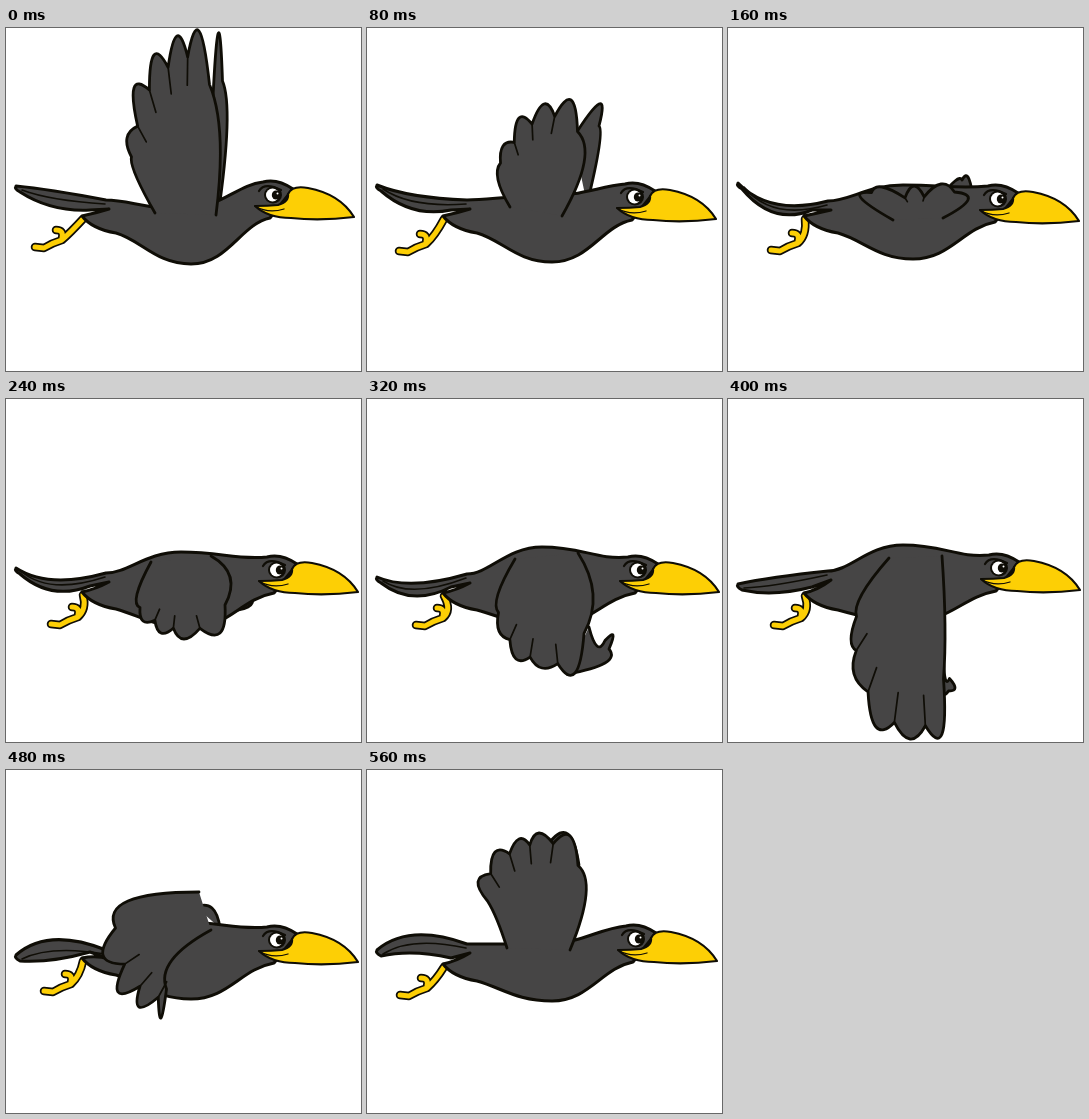
Write an HTML page with a canvas that moves like this. It is 355x343 px and loops after 640 ms.

```html
<!DOCTYPE html>
<html lang="en">
<head>
<meta charset="utf-8">
<title>Flying crow</title>
<style>
  html, body { margin: 0; width: 100%; height: 100%; overflow: hidden; background: #fff; }
  canvas { display: block; }
</style>
</head>
<body>
<canvas id="stage" width="355" height="343"></canvas>
<script>
const ctx = document.getElementById('stage').getContext('2d');
const STEP = 80;
const INK = '#0f0d06', FEATHER = '#464545', YELLOW = '#fdcf05';

// Per pose: head dx, dy; heights of tail tip, tail top, tail bottom,
// tail root, back, rump, belly; heel x, y.
const torsos = [
  [0, 0, 158, 161, 184, 172, 181, 188, 236, 56, 212],
  [1, 2, 157, 170, 190, 172, 168, 188, 234, 59, 216],
  [3, 4, 155, 188, 198, 173, 157, 188, 231, 70, 215],
  [4, 4, 169, 190, 202, 174, 153, 193, 229, 72, 218],
  [4, 4, 178, 192, 208, 175, 148, 194, 227, 76, 219],
  [4, 2, 185, 178, 198, 172, 146, 194, 222, 73, 219],
  [4, 3, 185, 157, 193, 180, 152, 188, 229, 65, 214],
  [2, 2, 180, 153, 179, 174, 174, 194, 231, 60, 218]
];

// Wings: notch depth, then rear root, feather tips, front edge, front root.
const downstroke = [
  [.13, [149, 185], [130, 148], [121, 110], [128, 60], [148, 27], [171, 8], [193, 3], [214, 110], [210, 187]],
  [.13, [143, 179], [131, 152], [136, 118], [152, 90], [177, 76], [204, 72], [217, 135], [195, 188]],
  [.35, [165, 192], [133, 170], [154, 159], [186, 158], [213, 156], [240, 172], [215, 190]],
  [.1, [145, 163], [131, 195], [137, 222], [155, 234], [178, 240], [214, 234], [224, 178], [205, 157]]
];
const upstroke = [
  [.06, [148, 160], [131, 195], [132, 232], [149, 260], [175, 269], [208, 274], [226, 195], [211, 154]],
  [.06, [161, 159], [134, 195], [123, 240], [126, 275], [148, 328], [182, 340], [214, 335], [217, 225], [214, 157]],
  [.15, [193, 122], [122, 131], [97, 185], [112, 222], [133, 237], [155, 248], [166, 190], [205, 160]],
  [.08, [140, 178], [130, 150], [111, 112], [128, 82], [152, 69], [172, 63], [203, 66], [219, 125], [203, 180]]
];
const nearWings = [...downstroke, ...upstroke];

const farWings = [
  [0, [206, 90], [212, 6], [221, 100], [212, 188]],
  [0, [206, 110], [232, 76], [232, 120], [220, 176]],
  [0, [212, 170], [227, 153], [241, 151], [246, 180]],
  [0, [222, 185], [249, 185], [242, 208], [218, 212]],
  [0, [200, 275], [238, 264], [246, 236], [230, 247], [222, 228]],
  [0, [216, 204], [216, 270], [227, 289], [214, 295], [206, 285]],
  [0, [190, 137], [206, 138], [214, 158]],
  [0, [183, 72], [201, 64], [212, 95]]
];

const mix = (a, b, t) => a.map((v, i) => v + (b[i] - v) * t);

function line(path, color, width) {
  ctx.strokeStyle = color;
  ctx.lineWidth = width;
  ctx.stroke(path);
}

function shape(path, fill, width) {
  ctx.fillStyle = fill;
  ctx.fill(path);
  line(path, INK, width);
}

// Each tip is the crest of a curve running from one notch to the next.
function drawWing([depth, rear, ...rest]) {
  const front = rest.pop();
  const center = mix(rear, front, .5);
  const outline = new Path2D(), creases = new Path2D();
  let from = rear;
  outline.moveTo(...rear);
  rest.forEach((tip, i) => {
    const inner = i > 0 && i < rest.length - 2;
    const to = i === rest.length - 1 ? front
      : mix(mix(tip, rest[i + 1], .5), center, inner ? depth : 0);
    outline.quadraticCurveTo(...mix(mix(from, to, .5), tip, 2), ...to);
    if (inner && depth) {
      creases.moveTo(...to);
      creases.lineTo(...mix(to, center, .18));
    }
    from = to;
  });
  shape(outline, FEATHER, 2.8);
  line(creases, INK, 1.7);
}

function drawBody([dx, dy, tip, top, bottom, root, back, rump, belly]) {
  shape(new Path2D(`M${287 + dx} ${161 + dy}Q${271 + dx} ${150 + dy} ${257 + dx} ${154 + dy}
    C230 ${157 + dy} 215 ${back} 175 ${back}C140 ${back} 122 ${root} 100 ${root}
    Q42 ${top} 10 ${tip}Q8 ${tip + 3} 14 ${tip + 6}
    Q45 ${bottom} 84 ${rump - 6}L103 ${root + 9}Q90 ${rump - 3} 76 ${rump}
    Q86 ${rump + 13} 110 ${rump + 17}C135 ${rump + 24} 150 ${belly} 185 ${belly}
    C222 ${belly} 235 ${196 + dy} ${264 + dx} ${190 + dy}Z`), FEATHER, 3);
  line(new Path2D(`M16 ${tip + 4}Q44 ${(top + bottom) / 2} 99 ${root + 4}`), INK, 1.6);
}

function drawLeg(rump, x, y) {
  const leg = new Path2D(`M77 ${rump + 3}Q${x + 9} ${y - 8} ${x} ${y}q-10 3 -18 8l-9 -1M${x} ${y - 2}q2 -8 -6 -8`);
  line(leg, INK, 8.5);
  line(leg, YELLOW, 5);
}

function ellipse(x, y, rx, ry, fill) {
  ctx.beginPath();
  ctx.ellipse(x, y, rx, ry, 0, 0, Math.PI * 2);
  ctx.fillStyle = fill;
  ctx.fill();
}

const beak = new Path2D('M249 178Q262 178 272 177Q283 174 282 166Q286 157 302 160Q334 166 348 189Q315 193 285 190Q262 190 249 178Z');
const smile = new Path2D('M249 178Q262 186 278 181');
const brow = new Path2D('M253 163Q257 156 268 159L275 162');

function drawHead(dx, dy) {
  ctx.save();
  ctx.translate(dx, dy);
  shape(beak, YELLOW, 2.2);
  line(smile, INK, 1.3);
  ellipse(267, 167, 9, 8.5, INK);
  ellipse(266.5, 167, 6.5, 6.5, '#fff');
  ellipse(270, 167, 4.2, 4.5, INK);
  ellipse(271.5, 165.5, 1, 1, '#fff');
  line(brow, INK, 2.2);
  ctx.restore();
}

function draw(now) {
  const pose = Math.floor(now / STEP) % torsos.length;
  const torso = torsos[pose];
  const [dx, dy] = torso;
  const [rump, , heelX, heelY] = torso.slice(7);
  ctx.clearRect(0, 0, 355, 343);
  drawLeg(rump, heelX, heelY);
  drawWing(farWings[pose]);
  drawBody(torso);
  drawWing(nearWings[pose]);
  drawHead(dx, dy);
  requestAnimationFrame(draw);
}

ctx.lineJoin = ctx.lineCap = 'round';
draw(0);
</script>
</body>
</html>
```
